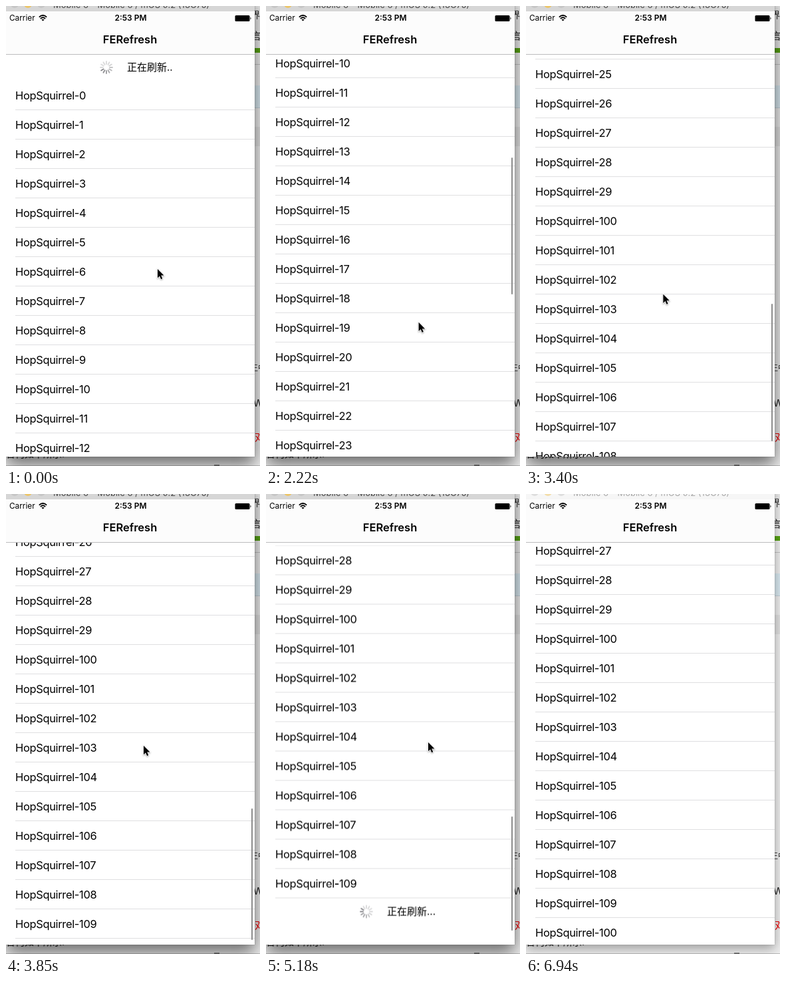
An HTML page for the animation above (7000 ms loop, 382 by 689 pixels).

```html
<!DOCTYPE html>
<html lang="zh">
<head>
<meta charset="utf-8">
<title>FERefresh</title>
<style>
html, body { margin: 0; width: 100%; height: 100%; overflow: hidden; }
body { font-family: Inter, "Noto Sans CJK SC", "Noto Sans CJK", sans-serif; color: #000; }
#stage { position: relative; width: 382px; height: 689px; overflow: hidden; background: #efefef; }
#stage div, #stage span, #stage svg { position: absolute; white-space: nowrap; }
.page div { left: 374px; width: 8px; }
.page span { line-height: 20px; font-size: 15px; color: #222; }
#window { left: 0; top: -14px; width: 374px; height: 689px; background: #d6d6d6; color: #484848;
  box-shadow: 0 11px 24px rgba(0,0,0,.58), 0 0 1px rgba(0,0,0,.5); }
#window i { position: absolute; top: 5px; width: 12px; height: 12px; border-radius: 50%; background: #c6c6c6; }
#window .amber { background: #ecc568; }
#caption { left: 71px; top: 4px; font-size: 13px; line-height: 16px; }
.idle #window { background: #f6f6f6; color: #a8a8a8;
  box-shadow: 0 6px 16px rgba(0,0,0,.36), 0 0 1px rgba(0,0,0,.4); }
.idle #window i { background: #dedede; }
.idle #window .amber { background: #f3deaa; }
#screen { left: 0; top: 8px; width: 374px; height: 667px; background: #fff; overflow: hidden; }
#list { left: 0; top: 64px; width: 374px; will-change: transform; }
.row { left: 14px; width: 360px; height: 43px; line-height: 44px; font-size: 16.5px;
  letter-spacing: -.35px; border-bottom: 1px solid #dfdfe1; }
.refresh { left: 0; width: 374px; height: 40px; line-height: 40px; font-size: 15px; }
.refresh svg { left: 141px; top: 10px; }
.refresh span { left: 182px; }
#bar { left: 368.5px; width: 2.5px; border-radius: 2px; background: #8c8c8c; }
#nav { left: 0; top: 0; width: 374px; height: 64px; background: #fcfcfc; border-bottom: 1px solid #bcbcbe; }
#nav span { line-height: 20px; }
#carrier { left: 5px; top: 0; font-size: 11.8px; }
#clock { left: 0; width: 375px; top: 0; text-align: center; font-size: 12px; font-weight: 600; }
#title { left: 0; width: 373px; top: 32px; text-align: center; font-size: 16.5px; font-weight: 600; }
#pointer { left: 0; top: 0; overflow: visible; filter: drop-shadow(0 1px 1px rgba(0,0,0,.35)); }
</style>
</head>
<body>
<div id="stage">
  <div class="page">
    <div style="top:63px;height:7px;background:#57a313"></div>
    <div style="top:87px;height:1px;background:#c2c2c2"></div>
    <div style="top:119px;height:33px;background:#d9e9f1"></div>
    <div style="top:152px;height:1px;background:#c4d2da"></div>
    <div style="top:181px;height:29px;background:#e2e2e2"></div>
    <span style="left:369px;top:3px;font-size:13px">界</span>
    <span style="left:369px;top:35px">言</span>
    <span style="left:368px;top:532px;font-size:11px">王中</span>
    <span style="left:372px;top:585px">W</span>
    <span style="left:374px;top:636px;color:#f00000">对</span>
    <span style="left:0;top:661px;font-size:14px">合何如下所示:</span>
    <div style="left:0;top:688px;width:382px;height:1px;background:#bbb"></div>
    <div style="left:313px;top:687px;width:8px;height:2px;background:#777"></div>
  </div>
  <div id="window">
    <i style="left:7px"></i><i class="amber" style="left:27px"></i><i style="left:47px"></i>
    <span id="caption">Mobile 6 - Mobile 6 / mOS 9.2 (13C75)</span>
  </div>
  <div id="screen">
    <div id="list"></div>
    <div id="bar"></div>
    <div id="nav">
      <span id="carrier">Carrier</span>
      <svg style="left:49px;top:5px" width="13" height="10" fill="none" stroke="#000" stroke-width="1.8">
        <path d="M.8 3.6Q6.5-1.6 12.2 3.6M2.9 6Q6.5 2.6 10.1 6"/>
        <path d="M6.5 9.5 4.4 7.5Q6.5 5.8 8.6 7.5Z" fill="#000" stroke="none"/>
      </svg>
      <span id="clock">2:53 PM</span>
      <svg style="left:344px;top:5px" width="26" height="11">
        <rect x=".5" y="1" width="22" height="9" rx="1.5"/><path d="M23.5 3.5q2 2 0 4z"/>
      </svg>
      <span id="title">FERefresh</span>
    </div>
  </div>
  <svg id="pointer" width="12" height="18">
    <path d="M0 0V14.2L3.3 11.2 5.5 16.3 7.8 15.3 5.6 10.3H10.2Z" transform="scale(.93)"
      stroke="#fff" stroke-width="1.5" paint-order="stroke"/>
  </svg>
</div>
<script>
const $ = id => document.getElementById(id);
const LOOP = 7000, STEP = 148.1, LEAD = 8, LAST = 6940;
const ROW = 44, ROWS = 40, FOOTER = 40, VIEW = 603, TRACK = 600;
const END = ROWS * ROW + FOOTER - VIEW;
const PULL = 3850, LOADED = 6360;

const progress = (t, from, to) => Math.min(1, Math.max(0, (t - from) / (to - from)));
const easeOut = p => 1 - (1 - p) ** 3;
const smooth = p => p * p * (3 - 2 * p);

// Two flicks to the end, a pull on the footer, one more drag and its bounce back.
function scrollAt(t) {
  const glide = (from, to, distance) => distance * easeOut(progress(t, from, to));
  return -FOOTER
    + glide(1480, 1800, FOOTER)
    + glide(1950, 2810, 672.5)
    + glide(3000, PULL, 493.5)
    + glide(PULL, 4150, END + 4 - 1166)
    + glide(4890, 5175, 25.5)
    + glide(5330, 5630, -29.5);
}

function pointerAt(t) {
  let x = 228, y = 394;
  const move = (from, to, dx, dy) => {
    const p = smooth(progress(t, from, to));
    x += dx * p;
    y += dy * p;
  };
  move(0, 1320, 11, 113);
  move(1950, 2800, -41, -145);
  move(2810, 3100, 8, 100);
  move(3100, 3840, 1, -85);
  move(3900, 4435, 23, 122);
  move(4890, 5175, 14, -127);
  move(5930, 6520, 100, 350);
  return [x, y];
}

const repeat = (n, make) => Array.from({ length: n }, (_, i) => make(i)).join('');
const spokes = repeat(12, i => `<path d="M0-5V-9" transform="rotate(${i * 30})"/>`);
const refresh = (id, top, text) => `<div class="refresh" id="${id}" style="top:${top}px">
  <svg width="20" height="20" viewBox="-10 -10 20 20" stroke="#6e6e72" stroke-width="1.9"
  stroke-linecap="round">${spokes}</svg><span>${text}</span></div>`;
const row = i => {
  const number = i < 30 ? i : 100 + (i - 30) % 10;
  return `<div class="row${i < ROWS ? '' : ' extra'}" style="top:${i * ROW}px">HopSquirrel-${number}</div>`;
};

$('list').innerHTML = refresh('header', -FOOTER, '正在刷新..') + repeat(ROWS + 2, row) +
  refresh('footer', ROWS * ROW, '正在刷新...');
const extras = document.querySelectorAll('.extra');
const spinners = [...document.querySelectorAll('.refresh svg')];

function drawBar(t, scroll) {
  const height = ROWS * ROW + (t > PULL ? FOOTER : 0);
  const over = Math.max(0, scroll - (height - VIEW));
  const length = TRACK * VIEW / height - over;
  const top = Math.min(66 + TRACK * scroll / height, 664 - length);
  const opacity = progress(t, 1950, 2000) - progress(t, 5450, 5800);
  $('bar').style.cssText = `top:${top}px;height:${length}px;opacity:${opacity}`;
}

function drawSpinners(t) {
  const head = Math.floor(t * 12 / 1000) + 8;
  spinners.forEach(spinner => [...spinner.children].forEach((spoke, i) => {
    const age = (head - i + 12) % 12;
    spoke.style.opacity = Math.max(.25, .85 - age * .09);
  }));
}

function draw(elapsed) {
  const now = elapsed % LOOP;
  const t = Math.max(0, Math.floor((now + LEAD) / STEP) * STEP - LEAD);
  const scroll = scrollAt(t), [x, y] = pointerAt(t);
  const loaded = t >= LOADED;
  $('stage').className = now >= LAST ? 'idle' : '';
  $('list').style.transform = `translateY(${-scroll}px)`;
  $('pointer').style.transform = `translate(${x}px,${y}px)`;
  $('footer').style.display = loaded ? 'none' : '';
  extras.forEach(e => e.style.display = loaded ? '' : 'none');
  drawSpinners(t);
  drawBar(t, scroll);
}

const start = performance.now();
function tick() {
  draw(performance.now() - start);
  requestAnimationFrame(tick);
}
tick();
</script>
</body>
</html>
```
